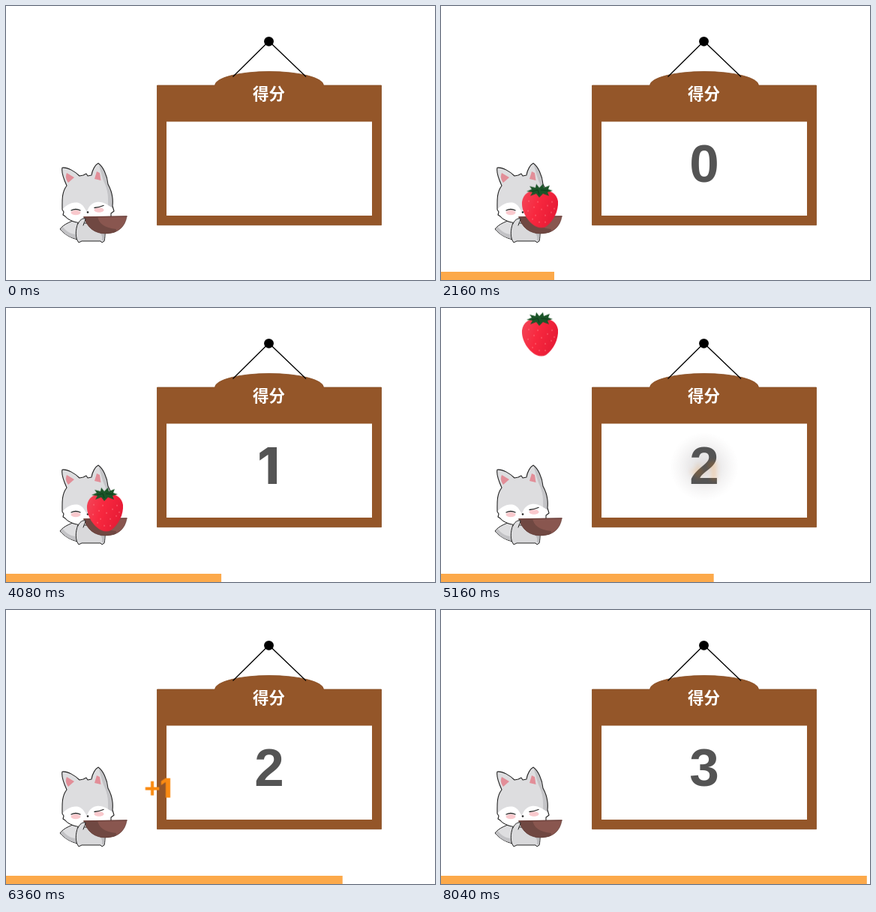
Animation of 572x366 px, one loop 8.1 s. Source, as an HTML page:

```html
<!DOCTYPE html>
<html lang="zh">
<head>
<meta charset="utf-8">
<title>得分</title>
<style>
html, body { margin: 0; width: 100%; height: 100%; overflow: hidden; background: #fff; }
svg { display: block; width: 572px; height: 366px; }

.num { font: bold 71px "Liberation Sans", Arial, sans-serif; fill: #545454; text-anchor: middle; }
.gain { font: bold 37px "Liberation Sans", Arial, sans-serif; fill: #f98a12; }
.one { font-family: Inter, sans-serif; font-weight: 800; }
.num.one { font-size: 67px; }
.gain-one { font-size: 36px; }
.title { font: bold 21.5px "Noto Sans CJK SC", "Noto Sans CJK", sans-serif; fill: #fff; text-anchor: middle; }

/* One shared 8.1 s loop; each round of drop, gain and glow is the same motion delayed. */
.bar, .num, .berry, .gain, .glow, .wipe { animation: 8100ms linear infinite; }
.berry, .gain, .glow, .num { opacity: 0; }
.berry { animation-name: drop; }
.gain { animation-name: fly; }
.glow { animation-name: flash; }
.r1 { animation-delay: 1335ms; }
.r2 { animation-delay: 3230ms; }
.r3 { animation-delay: 5112ms; }

.bar { animation-name: grow; transform: scaleX(0); }
@keyframes grow {
  0%, .38% { transform: scaleX(0); }
  100% { transform: scaleX(1); }
}

@keyframes drop {
  0% { opacity: 1; transform: translate(132px, 4px); animation-timing-function: cubic-bezier(.37, 0, .63, 1); }
  11.11% { opacity: 1; transform: translate(132px, 241.5px); }
  11.12%, 100% { opacity: 0; transform: translate(132px, 241.5px); }
}

@keyframes fly {
  0%, 11.11% { opacity: 0; transform: translate(132px, 247px); }
  11.12% { opacity: 1; transform: translate(132px, 247px); animation-timing-function: cubic-bezier(.37, 0, .63, 1); }
  22.22% { opacity: 1; transform: translate(351px, 218px); }
  22.84% { opacity: 1; transform: translate(351px, 218px); filter: blur(0); }
  24.2%, 100% { opacity: 0; transform: translate(351px, 218px); filter: blur(4px); }
}

@keyframes flash {
  0%, 22.83% { opacity: 0; }
  22.84% { opacity: 1; }
  24.2%, 100% { opacity: 0; }
}

.n0 { animation-name: zero; }
.n1 { animation-name: one; }
.n2 { animation-name: two; }
.n3 { animation-name: three; }
.num { animation-timing-function: step-end; }
@keyframes zero { 0% { opacity: 0; } 9.5% { opacity: 1; } 39.32%, 100% { opacity: 0; } }
@keyframes one { 0% { opacity: 0; } 39.32% { opacity: 1; } 62.72%, 100% { opacity: 0; } }
@keyframes two { 0% { opacity: 0; } 62.72% { opacity: 1; } 85.95%, 100% { opacity: 0; } }
@keyframes three { 0% { opacity: 0; } 85.95%, 100% { opacity: 1; } }

.wipe { animation-name: wipe; transform-origin: 333px 0; }
@keyframes wipe {
  0%, 9.5% { transform: scaleX(0); }
  11.8%, 100% { transform: scaleX(1); }
}
</style>
</head>
<body>
<svg viewBox="0 0 572 366">
  <defs>
    <radialGradient id="halo">
      <stop offset="0" stop-color="#6a6468" stop-opacity=".9"/>
      <stop offset=".45" stop-color="#8a8488" stop-opacity=".62"/>
      <stop offset="1" stop-color="#b0a8a8" stop-opacity="0"/>
    </radialGradient>
    <linearGradient id="red" x2="1" y2=".35">
      <stop offset="0" stop-color="#f2485a"/>
      <stop offset=".5" stop-color="#f8283f"/>
      <stop offset="1" stop-color="#e81c36"/>
    </linearGradient>
    <clipPath id="reveal"><rect class="wipe" x="333" y="160" width="42" height="100"/></clipPath>
    <clipPath id="skull"><path id="headShape" d="M81 240C76 229 74 220 75 216C82 215 92 221 98 227L103 226L107 224L109 227L114 226C115 219 119 212 123 210C129 214 135 226 136 238C141 247 143 258 142 267L144 274L140 277L140 281C132 288 118 290 106 290C94 290 84 287 79 281L76 279L77 275L75 272C75 260 74 249 81 240Z"/></clipPath>
    <clipPath id="bowlClip"><path id="bowlShape" d="M104 282L161 281C159 295 149 304 133 304C118 304 108 296 104 282Z"/></clipPath>
    <g id="berry">
      <path d="M0 9C-11 7 -22 11 -24 24C-25 38 -15 52 -5 57Q2 60 8 57C18 50 25 36 24 23C22 11 11 7 0 9Z" fill="url(#red)"/>
      <path d="M-15 23h.1M-8 31h.1M-16 36h.1M-6 42h.1M2 34h.1M10 29h.1M16 24h.1M7 42h.1M15 38h.1M-1 51h.1M7 51h.1M-10 47h.1M-3 24h.1M19 33h.1" stroke="#ff8088" stroke-width="1.4" stroke-linecap="round"/>
      <path d="M-5 0L-1 5L4 0L5 5L13 2L11 7L17 9L10 11L12 16L4 13L-1 18L-5 13L-13 16L-10 11L-18 10L-11 7L-14 3L-6 5Z" fill="#1b5528"/>
      <path d="M-11 10L-3 8L-1 14M1 8L11 9" fill="none" stroke="#0e3c1b"/>
    </g>
    <g id="gain">
      <text x="-19" y="13">+</text>
      <text class="one gain-one" x="2" y="13">1</text>
    </g>
  </defs>

  <g id="board">
    <path d="M201.500 106H278.500A72.500 18.500 0 0 1 423.500 106H500.500V292.700H201.500Z" fill="#945629" stroke="#844a1f" stroke-width=".8"/>
    <path d="M214 154.500H488V280H214Z" fill="#fff"/>
    <path d="M302.500 94.500L350.500 47L400 94.500" fill="none" stroke="#000" stroke-width="1.3"/>
    <circle cx="350.500" cy="47.300" r="6.400"/>
    <text class="title" x="350.500" y="125">得分</text>
  </g>

  <g id="fox" stroke-linejoin="round" stroke-linecap="round">
    <path d="M98 284C88 287 77 291 72 298C78 305 86 310 96 312Z" fill="#dedee0" stroke="#222"/>
    <path d="M72.500 298C78 305 86 310 95 311L92 305C85 304 79 300 76 295Z" fill="#c2c2c5"/>
    <path d="M97 287C93 296 92 306 95 313L97 316L101 314H126L128 316L131 314C133 305 132 296 130 288Z" fill="#d9d9db" stroke="#222"/>
    <path d="M124 303C127 304 129 307 128 313L131 313L131.500 300Z" fill="#bdbdc0"/>
    <g clip-path="url(#skull)">
      <rect x="70" y="205" width="80" height="90" fill="#dddddf"/>
      <path d="M123 209C126 219 128 230 132 238C137 249 136 260 136 269L146 276V205Z" fill="#c4c4c7"/>
      <path d="M74 273C80 266 88 261 97 263C103 265 105 271 108 275C110 268 114 263 121 262C130 261 136 266 145 272V295H74Z" fill="#fff"/>
    </g>
    <path d="M81 223L91 229L83 236C80 232 79 228 81 223Z" fill="#e28e98"/>
    <path d="M121 221L125 223L126.500 233L118 231Z" fill="#e28e98"/>
    <use href="#headShape" fill="none" stroke="#222" stroke-width="1.100"/>
    <ellipse cx="93" cy="276" rx="6.500" ry="3.200" fill="#f9c9cd"/>
    <ellipse cx="124" cy="272.500" rx="6.500" ry="3.200" fill="#f9c9cd"/>
    <path d="M87 273Q93 270 99 273M118 269.500Q124 269 130 266.500" fill="none" stroke="#222" stroke-width="1.300"/>
    <circle cx="109" cy="275.500" r="1.300" fill="#222"/>
    <g clip-path="url(#bowlClip)">
      <rect x="100" y="278" width="65" height="30" fill="#89564f"/>
      <path d="M100 278H122C122 290 130 296 147 298L146 308H100Z" fill="#704842"/>
    </g>
    <use href="#bowlShape" fill="none" stroke="#5d3934" stroke-width=".6"/>
    <path d="M104 282L161 281" stroke="#70433d" stroke-width="1.600"/>
    <path d="M96 291C98 286 102 283 106 284C106 287 104 289 103 293" fill="#dddddf" stroke="#222"/>
  </g>

  <g clip-path="url(#reveal)"><text class="num n0" x="351" y="235">0</text></g>
  <circle class="glow r1" cx="351" cy="212" r="46" fill="url(#halo)"/>
  <circle class="glow r2" cx="351" cy="212" r="46" fill="url(#halo)"/>
  <circle class="glow r3" cx="351" cy="212" r="46" fill="url(#halo)"/>
  <text class="num one n1" x="350" y="235">1</text>
  <text class="num n2" x="351" y="235">2</text>
  <text class="num n3" x="351" y="235">3</text>

  <use class="gain r1" href="#gain"/>
  <use class="gain r2" href="#gain"/>
  <use class="gain r3" href="#gain"/>
  <use class="berry r1" href="#berry"/>
  <use class="berry r2" href="#berry"/>
  <use class="berry r3" href="#berry"/>

  <rect class="bar" y="355" width="572" height="11" fill="#fca94a"/>
</svg>
</body>
</html>
```
